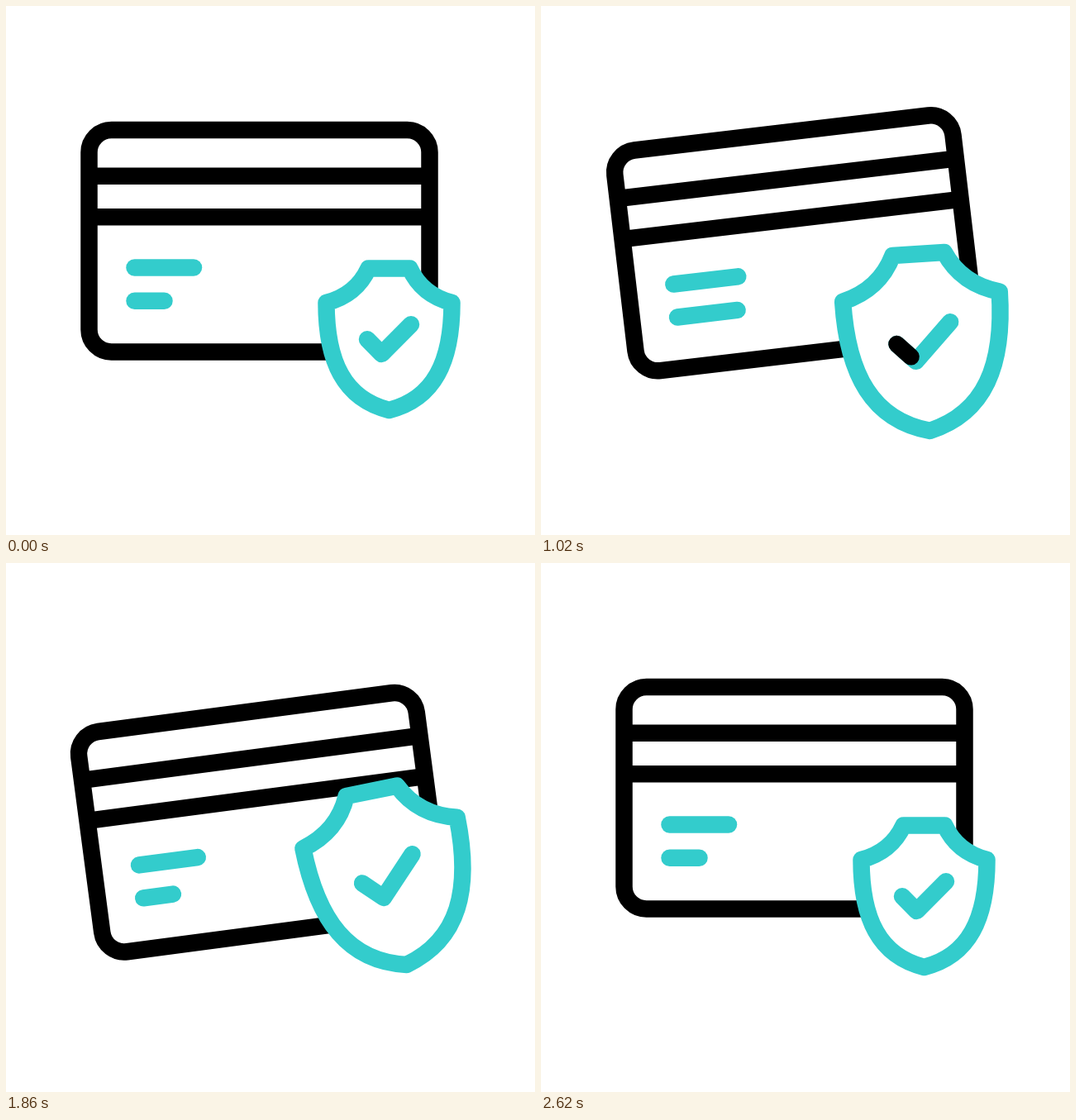
Animation of 640x640 px, one loop 3000 ms. Source, as an HTML page with a canvas:

```html
<!DOCTYPE html>
<html lang="en">
<head>
<meta charset="utf-8">
<title>Secure card</title>
<style>
  html, body { margin: 0; width: 100%; height: 100%; overflow: hidden; background: #fff; }
  canvas { display: block; width: 640px; height: 640px; }
</style>
</head>
<body>
<canvas id="stage" width="640" height="640"></canvas>
<script>
const ctx = document.getElementById('stage').getContext('2d');
const LOOP = 3000, START = 220, END = 2500;
const TEAL = '#33cccc', BLACK = '#000';
const STROKE = 20.5;
let now = 0;

// Smooth 0 to 1 between two times.
function ease(from, to) {
  const p = Math.min(1, Math.max(0, (now - from) / (to - from)));
  return p * p * (3 - 2 * p);
}

// Rises over a..b and falls over c..d.
const bump = (a, b, c, d) => ease(a, b) - ease(c, d);

// Swings back, forth (resting from high to leave), back again, and home.
function swing(size, low, high, leave, back) {
  return size * (bump(low, high, leave, back)
    - 0.93 * bump(START, low, low, high)
    - 0.82 * bump(leave, back, back, END));
}

function pose(x, y, degrees, scale = 1) {
  ctx.translate(x, y);
  ctx.rotate(degrees * Math.PI / 180);
  ctx.scale(scale, scale);
}

// Strokes without the current scale, so line weight stays constant.
function stroke(path, color, cap = 'round') {
  const placed = new Path2D();
  placed.addPath(path, ctx.getTransform());
  ctx.save();
  ctx.resetTransform();
  ctx.lineWidth = STROKE;
  ctx.lineCap = cap;
  ctx.lineJoin = 'round';
  ctx.strokeStyle = color;
  ctx.stroke(placed);
  ctx.restore();
}

function polyline(points) {
  const path = new Path2D();
  points.forEach(([x, y]) => path.lineTo(x, y));
  return path;
}

const bar = (x, y, length) => polyline([[x, y], [x + length, y]]);

const cardFrame = new Path2D();
cardFrame.roundRect(-206, -134.25, 412, 268.5, 27);

const shield = new Path2D(
  'M-25 -85.75 H25 C34.5 -65 52 -50.5 76 -44.25 C76 27 54.5 72 0 85.75' +
  'C-54.5 72 -76 27 -76 -44.25 C-52 -50.5 -34.5 -65 -25 -85.75 Z');

const tick = [[-26.5, 0], [-9, 17.8], [26.5, -18]];
const BEND = 0.33;

// Part of the tick between two fractions of its length.
function tickPart(from, to) {
  const [a, b, c] = tick;
  const mix = (p, q, k) => p.map((n, i) => n + (q[i] - n) * k);
  const point = f => f < BEND ? mix(a, b, f / BEND) : mix(b, c, (f - BEND) / (1 - BEND));
  const corner = from < BEND && to > BEND ? [b] : [];
  return polyline([point(from), ...corner, point(to)]);
}

function drawCard() {
  const bob = swing(-36, 780, 1300, 1300, 1870);
  const turn = swing(10.7, 860, 1505, 1540, 1920);
  const long = 71.5 - 11.5 * bump(START, 820, 2040, END) + 63 * bump(820, 1380, 1380, 2040);
  const short = 36 - 8 * bump(START, 660, 660, 1210) + 54 * bump(660, 1210, 1210, 1660);

  ctx.save();
  pose(306.5, 284.25 + bob, turn);
  stroke(cardFrame, BLACK);
  stroke(bar(-206, -78.5, 412), BLACK, 'butt');
  stroke(bar(-206, -29, 412), BLACK, 'butt');
  stroke(bar(-151, 32.25, long), TEAL);
  stroke(bar(-151, 72.5, short), TEAL);
  ctx.restore();
}

function drawShield() {
  const bob = swing(28, 740, 1267, 1267, 1900);
  const turn = swing(14.7, 815, 1330, 1480, 1900);
  const scale = 1 + 0.25 * bump(START, 860, 1960, 2520);
  const head = ease(803, 1482), tail = ease(1116, 1793);

  ctx.save();
  pose(463.5, 403.25 + bob, turn, scale);
  ctx.fillStyle = '#fff';
  ctx.fill(shield);
  stroke(shield, TEAL);
  stroke(polyline(tick), TEAL);
  if (head - tail > 0.001) stroke(tickPart(tail, head), BLACK);
  ctx.restore();
}

function frame() {
  now = performance.now() % LOOP;
  ctx.fillStyle = '#fff';
  ctx.fillRect(0, 0, 640, 640);
  drawCard();
  drawShield();
  requestAnimationFrame(frame);
}
frame();
</script>
</body>
</html>
```
